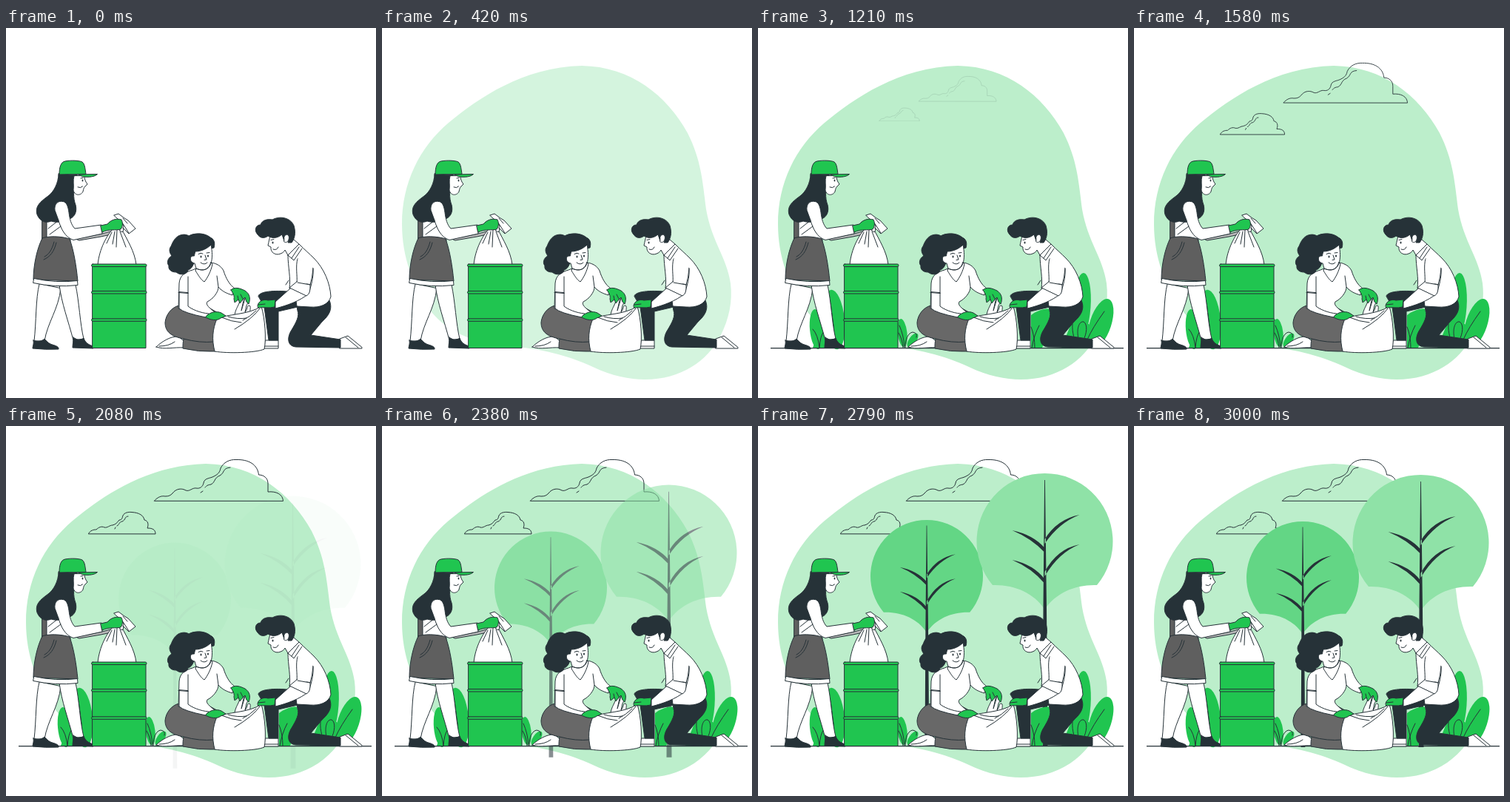
These frames come from a looping animation (500 by 500 pixels, 3040 ms). An HTML page:

```html
<!DOCTYPE html>
<html lang="en">
<head>
<meta charset="utf-8">
<title>Clean-up day</title>
<style>
  html, body { margin: 0; width: 100%; height: 100%; overflow: hidden; background: #fff; }
  svg { display: block; width: 100vw; height: 100vh; }
  path, rect, ellipse { stroke: #263238; stroke-width: 1; stroke-linejoin: round; stroke-linecap: round; fill: #fff; }
  .dark { fill: #263238; }
  .green { fill: #20c550; }
  .gray { fill: #5f5f5f; }
  .line { fill: none; }
  .flat, .leaf { stroke: none; }
  .leaf { fill: #20c550; }
</style>
</head>
<body>
<svg viewBox="0 0 500 500">
  <g id="blob">
    <path class="flat" style="fill:#bceecb" d="M27 265C27 310 42 345 60 375C85 410 120 425 170 430C215 433 250 442 285 458C310 470 335 475 355 475C405 475 440 449 457 417C469 393 474 370 471 345C466 310 446 290 438 245C433 205 431 178 413 142C385 91 336 52 270 51C190 53 130 95 90 128C50 162 27 210 27 265Z"/>
  </g>

  <g id="clouds">
    <path class="line" d="M200.500 101C205 96 210 94 215 95C220 95 222 94 225 91C230 84 238 84 243 87C248 89 252 83 257 84C262 85 266 82 267 77C268 70 276 71 281 68C287 65 289 62 290 57C294 49 302 45 311 45.500C328 45 340 52 341.500 66C348 66 354 70 354 78V89C365 88 374 92 374.500 101Z"/>
    <path class="line" d="M303 56C292 57 296 63 289 67C281 70 283 76 277 79C270 80 271 82 269 83M266 88L263 90"/>
    <path class="line" d="M111.500 145.500C114 141 118 140 122 140C125 137 129 135 133 137C137 138 140 134 144 134C148 133 150 131 153 127C157 127 157 124 158 121C160 117 165 116 170 116.500C180 117 186 121 187 127C192 128 193 133 191 138C198 138 202 140 202 145.500Z"/>
    <path class="line" d="M165 122C160 122 162 127 157 129C152 130 154 133 150 135M148 137L147 139"/>
  </g>

  <g id="trees"></g>

  <g id="plants">
    <ellipse class="leaf" cx="103" cy="394" rx="14" ry="40.500" transform="rotate(-6 103 394)"/>
    <ellipse class="leaf" cx="79" cy="407" rx="9" ry="27" transform="rotate(-5 79 407)"/>
    <path class="leaf" d="M74 432L84 405L100 400L116 432Z"/>
    <path class="line" d="M98 372Q103 402 104 432M74 407Q81 414 83 432M83 432Q84 416 89 410"/>
    <ellipse class="leaf" cx="195" cy="412" rx="6.500" ry="19" transform="rotate(-7 195 412)"/>
    <ellipse class="leaf" cx="209" cy="422" rx="5" ry="11" transform="rotate(35 209 422)"/>
    <path class="line" d="M191 402Q197 415 198 432M199 432C199 420 203 412 209 411Q216 412 214 418M190 412Q195 420 196 432"/>
    <ellipse class="leaf" cx="437" cy="377" rx="12.500" ry="46" transform="rotate(4 437 377)"/>
    <ellipse class="leaf" cx="463" cy="399" rx="14.500" ry="34.500" transform="rotate(18 463 399)"/>
    <path class="leaf" d="M369 432V388C375 383 388 378 393 380L400 396L384 432ZM410 432L425 395L447 400L466 422L455 432Z"/>
    <path class="line" d="M425 400C424 412 428 422 432 432M433 420C430 406 434 396 440 397C446 400 444 414 440 421M468 383Q452 405 445 421M380 402Q373 415 370 432M369 404Q374 416 374 432"/>
  </g>

  <g id="floor"><path class="line" style="stroke-width:1.200;stroke-linecap:butt" d="M17 432.700H494"/></g>

  <!-- girl at the barrel -->
  <g>
    <path d="M45 346C40 365 41 398 38 423H52C56 398 71 380 74 352Z"/>
    <path d="M72 347C75 372 84 395 91 422L105 420C100 400 99 370 94 347Z"/>
    <path class="dark" d="M37 422C38 427 36 430 36 433Q54 435 71 434C72 430 65 429 60 427C56 425 54 422 52 420C48 424 42 424 37 422Z"/>
    <path class="dark" d="M91 418C91 424 90 428 90 432L118 433V430C111 428 107 425 105 419C101 422 96 422 91 418Z"/>
    <path style="fill:#b8b8b8" d="M95 285L130 278L158 270L157 276L128 282L99 287Z"/>
    <path d="M56 250C53 262 54 275 51 288H87C86 270 85 250 80 240Z"/>
    <path class="gray" d="M49 255L55 252V287H49Z"/>
    <path class="gray" d="M49 284C56 281 74 281 86 285C92 302 95 322 97 342L37 340C37 320 42 298 49 284Z"/>
    <path d="M38 338.500Q68 345 96.500 341.500L97 347.500Q66 351 37 344.500Z"/>
    <path class="line" d="M68 290C65 302 60 309 51 313M65 289C62 300 58 306 52 309"/>
    <path class="dark" d="M71 197C71 210 64 222 57 227C46 235 39 241 42 252C46 262 54 264 61 261C70 264 80 261 86 258C96 254 96 243 93 236C90 225 92 213 96 199Z"/>
    <path d="M92 200C90 206 92 212 91 219C93 228 102 226 104 221C105 217 105 216 107 214L110 211C107 207 106 204 106 200Z"/>
    <path d="M66 246C65 238 70 233 77 234.500C82 235 84 242 85 249C86 258 88 266 93 271L129 266L130 278L91 286.500C80 283 74 271 71 260Z"/>
    <path class="line" d="M57 271L71 260M59 279L74 268"/>
    <ellipse class="dark flat" cx="103.500" cy="206" rx=".9" ry="1.600"/>
    <path class="line" d="M101 203L104 202.500M97 215Q101 217 103.500 214"/>
    <path class="green" d="M72 198C72 188 74 181 80 180C88 178.500 99 179 103 181C107 184 107 192 108 197Z"/>
    <path class="green" d="M72 198H96L123.500 197.500C120 201 112 202 104 201L98 198"/>
  </g>

  <!-- bag and barrel -->
  <g>
    <path d="M146 253L152 251L160 257L165 260L175 271L166 278L158 270L153 260Z"/>
    <path class="line" d="M157 263L166 277M158 257L164 264"/>
    <path d="M145 271C137 279 126 298 124 320H176C174 302 164 287 156 271Z"/>
    <path class="line" d="M143 276L136 291M147 275L144 292M150 273L149 296M154 275L162 296"/>
    <path d="M153 265L158 265Q160 268 158 270Q160 273 157 276L153 273Z"/>
    <path class="green" d="M128 267L137 265C142 259 149 257 156 259C158 263 158 268 155 272C148 274 140 271 130 276Z"/>
    <path class="green" d="M117 321H189V432.500H117Z"/>
    <rect class="green" x="115.500" y="319" width="74.500" height="3.500" rx="1.700"/>
    <rect class="green" x="115.500" y="355.500" width="74.500" height="3.500" rx="1.700"/>
    <rect class="green" x="115.500" y="392.800" width="74.500" height="3.500" rx="1.700"/>
  </g>

  <!-- kneeling woman -->
  <g>
    <path d="M203 431C210 424 223 416 233 417L243 425L240 432C228 431 214 435 203 431Z"/>
    <path class="line" d="M207 430Q220 430 228 424"/>
    <path class="gray" style="fill:#686868" d="M234 375C224 377 216 387 215 398C215 411 224 417 240 420C239 425 239 429 239 433Q260 438 283 437L292 388L274 378Z"/>
    <path class="line" d="M240 420Q262 426 281 424"/>
    <path d="M252 327C242 330 235 334 234 345L233 379C245 385 262 386 272 390L282 384C276 379 269 374 272 370C280 366 287 357 287 350C292 356 299 359 306 361L309 352C302 347 297 338 294 328C291 322 285 318 277 317Z"/>
    <path d="M234 357L234 379Q240 385 270 391L274 386C262 385 251 380 246 376L246 358Z"/>
    <path class="line" d="M246 336V358M233 357.500L246 358.500M285 335L287 350"/>
    <path class="dark" d="M247 281C243 278 237 279 233 281C227 285 225 290 223 295C219 300 222 305 224 308C218 311 217 318 220 321C219 327 224 330 230 330C236 335 245 333 246 327C253 325 255 316 257 302L281 297C283 290 281 285 276 283C268 276 253 277 247 281Z"/>
    <path d="M256 302C264 302 272 298 277 293C279 302 279 312 277 318C274 327 266 329 257 325L256 328C260 334 263 340 268 343C272 338 277 329 279 319L277 316C274 327 266 329 257 325L255 318C248 317 247 307 254 308Z"/>
    <ellipse class="dark flat" cx="263.500" cy="309" rx="1" ry="1.500"/>
    <ellipse class="dark flat" cx="273" cy="308" rx="1" ry="1.500"/>
    <path class="line" d="M260 305.500Q263 303 266 305M271 304L275 303.500M269 307L271 313L268 313.500M263 317Q268 321 272 317"/>
  </g>

  <!-- kneeling man -->
  <g>
    <path d="M350 422H368V433H347C347 430 350 428 350 422Z"/>
    <path class="line" d="M348 430H368"/>
    <path d="M451 420L462 416L481 431.500V433H451Z"/>
    <path class="line" d="M459 418L476 432"/>
    <path class="dark" d="M341 362C343 355 367 354 390 357L394 377L368 383L368 422H355L349 377Z"/>
    <path class="dark" d="M393 373L437 368C442 380 436 389 427 397L412 415L452 421V432L392 431C379 430 380 417 386 408C392 398 397 389 394 382Z"/>
    <path d="M381 307L396 292C404 300 410 305 416 311C430 325 438 345 439 363C436 374 424 378 411 377L393 376L391 361L383 352C385 337 381 323 381 307Z"/>
    <path d="M394 312C391 322 394 335 393 344L364 370L364 379C380 375 397 369 409 359C412 349 416 337 415 325Z"/>
    <path d="M394 342L383 351L406 362C411 359 411 354 411 347Z"/>
    <path class="flat" d="M394.500 311L414.500 322L412 346L394 344Z"/>
    <path class="line" d="M378 347L382 341M415 325Q414 338 411 347L394 344M381 307L389 314L400 298M386 311L396 296"/>
    <path d="M357 281C356 285 355 289 354 294L358 296C357 303 364 308 371 305C374 304 376 302 377 300L381 307L396 292L389 286L377 277Z"/>
    <path class="dark" d="M340 279C335 274 337 266 344 266C346 259 354 258 360 259C371 253 385 257 389 267C392 277 390 285 386 290H381C384 283 381 278 377 282L376 288L373 279C367 284 360 285 354 281C349 285 343 284 340 279Z"/>
    <path d="M376 282C379 276 384 280 382 286C381 289 378 291 376 289Z"/>
    <ellipse class="dark flat" cx="360.500" cy="290" rx="1" ry="1.500"/>
    <path class="line" d="M358 286.500L362 285.500M361 299Q366 301 368 296"/>
  </g>

  <!-- shared bag -->
  <g>
    <path d="M309 388C310 379 315 375 316 368C317 362 322 362 321 368L318 382C320 375 322 370 323 365C327 363 328 370 325 375L323 384C327 379 326 374 329 375C332 377 328 383 331 388Z"/>
    <path d="M285 393C299 386 328 388 345 376C350 393 352 420 349 434C337 439 300 440 282 437C278 421 279 407 285 393Z"/>
    <path class="line" d="M291 391Q305 397 318 398M300 390Q313 394 325 392M343 379Q333 393 309 407M338 382Q330 390 320 395"/>
    <path class="green" d="M270 390C275 384 284 382 291 385L297 389L293 391L290 392C286 396 276 395 270 391Z"/>
    <path class="green" d="M304 354C309 349 317 352 323 355C329 359 331 365 328 373L325 370L323 364L320 367L316 372L314 367L309 371L308 366C309 362 307 359 304 354Z"/>
    <path class="line" d="M317 360L320 366M313 362L314 367"/>
    <path class="green" d="M340 375C341 369 348 366 354 368L364 367L363 377C356 379 348 377 341 378Z"/>
    <path class="line" d="M341 374L350 373"/>
  </g>
</svg>
<script>
const $ = id => document.getElementById(id);
const LOOP = 3040, FRAME = 1000 / 24;

// Tree drawn in units of a crown with radius 92, centred on 0,0
function tree(x, y, r, color) {
  const k = r / 92, base = (434 - y) / k;
  const branch = (tx, ty, jy) =>
    `M${tx} ${ty}Q${tx * 0.35} ${ty + 6} 0 ${jy - 3}L0 ${jy + 3}Q${tx * 0.4} ${ty + 11} ${tx} ${ty}Z`;
  return `<g transform="translate(${x} ${y}) scale(${k})">
    <path class="flat" style="fill:${color}" d="M-70.500 59A92 92 0 1 1 70.500 59C42 58 15 69 0 92C-15 69 -42 58 -70.500 59Z"/>
    <path class="dark flat" d="M-.4 -83L.4 -83L2.500 90L4 ${base}H-3L-2 90Z
      ${branch(47, -36, 0)}${branch(47, 4, 44)}${branch(-44, -15, 12)}${branch(-44, 25, 54)}"/>
  </g>`;
}
$("trees").innerHTML = tree(228, 205, 76, "#63d685") + tree(387.5, 158, 92, "#8fe2a7");

const bez = (t, a, b) => 3 * (1 - t) * (1 - t) * t * a + 3 * (1 - t) * t * t * b + t * t * t;

// cubic-bezier(.36, -.01, .5, 1.38): ends with a small overshoot
function ease(x) {
  if (x <= 0) return 0;
  if (x >= 1) return 1;
  let lo = 0, hi = 1;
  for (let i = 0; i < 24; i++) {
    const mid = (lo + hi) / 2;
    if (bez(mid, 0.36, 0.5) < x) lo = mid; else hi = mid;
  }
  return bez(lo, -0.01, 1.38);
}

function fade(id, p) {
  $(id).setAttribute("opacity", Math.max(0, Math.min(1, p)));
}

function draw(ms) {
  const step = Math.floor((ms % LOOP + 8) / FRAME) % 73;
  const t = step / 24 + 0.028;
  fade("blob", ease(t));
  const green = ease(t - 0.5);
  fade("plants", green);
  fade("floor", green);

  const zoom = ease(t - 1), s = 0.5 + zoom / 2;
  fade("clouds", zoom);
  $("clouds").setAttribute("transform", `translate(242.8 95.5) scale(${s}) translate(-242.8 -95.5)`);

  const rise = ease(t - 2);
  fade("trees", rise);
  $("trees").setAttribute("transform", `translate(0 ${30 * (1 - rise)})`);
}

const start = performance.now();
function tick() {
  draw(performance.now() - start);
  requestAnimationFrame(tick);
}
draw(0);
requestAnimationFrame(tick);
</script>
</body>
</html>
```
